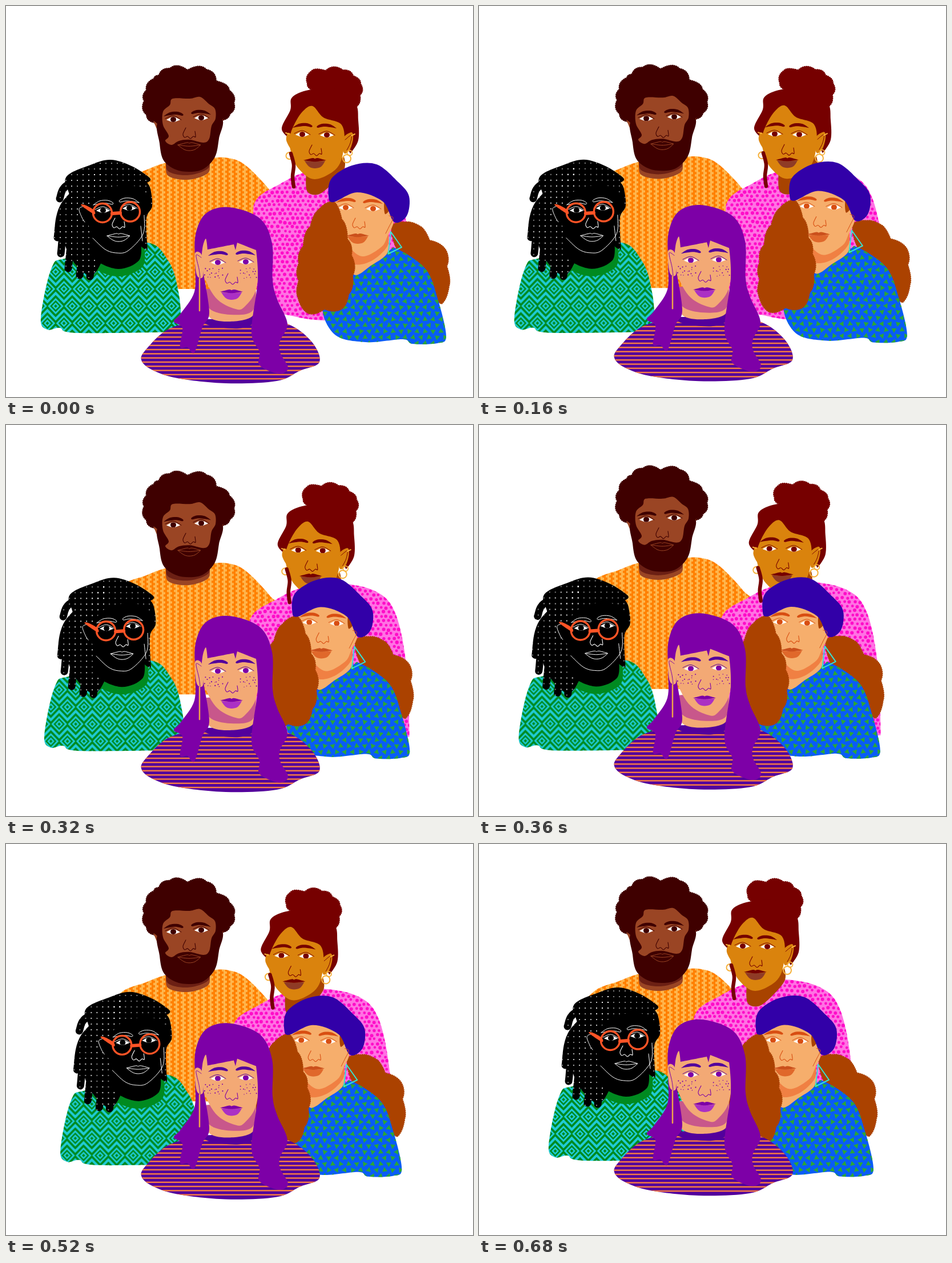
Recreate the animation shown at these times as an HTML page with a canvas. Size 818x684 px, loop 1.2 s.

```html
<!DOCTYPE html>
<html lang="en">
<head>
<meta charset="utf-8">
<title>Five friends</title>
<style>
html, body { margin: 0; width: 100%; height: 100%; overflow: hidden; background: #fff; }
canvas { display: block; width: 818px; height: 684px; }
</style>
</head>
<body>
<canvas id="stage" width="818" height="684"></canvas>
<script>
const ctx = document.getElementById('stage').getContext('2d');
const LOOP = 1200, STEP = 40, MOVE_FROM = 40, MOVE_FOR = 640;
const TAU = Math.PI * 2;

const points = text => text.split(' ').map(p => {
  const [x, y] = p.split(',').map(parseFloat);
  return { x, y, sharp: p.endsWith('!') };
});

// Smooth curve through "x,y x,y ..."; "!" marks a corner.
function curve(text, closed) {
  const pts = points(text), n = pts.length, path = new Path2D();
  const get = i => closed ? pts[(i + n) % n] : pts[Math.max(0, Math.min(n - 1, i))];
  const pull = (i, axis) => get(i).sharp ? 0 : (get(i + 1)[axis] - get(i - 1)[axis]) / 6;
  path.moveTo(pts[0].x, pts[0].y);
  for (let i = 0; i < (closed ? n : n - 1); i++) {
    const a = get(i), b = get(i + 1);
    path.bezierCurveTo(a.x + pull(i, 'x'), a.y + pull(i, 'y'),
      b.x - pull(i + 1, 'x'), b.y - pull(i + 1, 'y'), b.x, b.y);
  }
  return path;
}

function shape(paint, text) {
  ctx.fillStyle = paint;
  ctx.fill(curve(text, true));
}

function line(color, width, text, closed = false) {
  ctx.strokeStyle = color;
  ctx.lineWidth = width;
  ctx.stroke(curve(text, closed));
}

// Curly hair: one outward bump between each two points, with a rough edge.
function curls(color, bulge, text) {
  const pts = points(text), n = pts.length, path = new Path2D();
  const cx = pts.reduce((s, p) => s + p.x, 0) / n, cy = pts.reduce((s, p) => s + p.y, 0) / n;
  path.moveTo(pts[0].x, pts[0].y);
  pts.forEach((a, i) => {
    const b = pts[(i + 1) % n], mx = (a.x + b.x) / 2, my = (a.y + b.y) / 2;
    const k = 2 * bulge * Math.hypot(b.x - a.x, b.y - a.y) / Math.hypot(mx - cx, my - cy);
    path.quadraticCurveTo(mx + (mx - cx) * k, my + (my - cy) * k, b.x, b.y);
  });
  ctx.fillStyle = ctx.strokeStyle = color;
  ctx.fill(path);
  ctx.lineWidth = 2;
  ctx.setLineDash([1, 2.4]);
  ctx.stroke(path);
  ctx.setLineDash([]);
}

function circle(x, y, r) {
  const path = new Path2D();
  path.arc(x, y, r, 0, TAU);
  return path;
}

function ring(color, width, x, y, r) {
  ctx.strokeStyle = color;
  ctx.lineWidth = width;
  ctx.stroke(circle(x, y, r));
}

function at(x, y, flip, draw) {
  ctx.save();
  ctx.translate(x, y);
  ctx.scale(flip, 1);
  draw();
  ctx.restore();
}

function eye(iris, lid) {
  const almond = curve('-12,0! 0,-5 12,0! 0,4', true);
  ctx.save();
  ctx.fillStyle = '#fff';
  ctx.fill(almond);
  ctx.clip(almond);
  ctx.fillStyle = iris;
  ctx.fill(circle(0, -0.5, 5));
  ctx.restore();
  line(lid, 1, '-14,-2 0,-7 14,0');
}

// Both eyes with their brows; an outlined face gets open brows.
function gaze(lx, ly, rx, ry, lift, iris, brow, outlined) {
  [[lx, ly, 1], [rx, ry, -1]].forEach(([x, y, flip]) => {
    at(x, y, 1, () => eye(iris, brow));
    at(x, y - lift, flip, () => {
      const text = '-17,4! -6,-3 8,-4 17,0 16,3 6,1 -6,2';
      outlined ? line(brow, 1, text, true) : shape(brow, text);
    });
  });
}

const nose = (color, x, y) => at(x, y, 1, () =>
  line(color, 1.1, '-5,-16 -10,-5 -7,1 -2,-1 3,3 8,-1 12,0 11,-10'));

function lips(x, y, upper, lower, outlined) {
  at(x, y, 1, () => {
    const top = '-20,0! -4,-4 0,-3 5,-4 20,0! 5,2 -5,2', bottom = '-18,1! 0,2 18,1! 11,11 0,14 -10,11';
    if (outlined) {
      line(upper, 1, top, true);
      line(upper, 1, '-19,1 -9,8 0,10 10,8 19,1');
    } else {
      shape(lower, bottom);
      shape(upper, top);
    }
  });
}

function tile(w, h, draw) {
  const c = document.createElement('canvas');
  c.width = w;
  c.height = h;
  draw(c.getContext('2d'));
  return ctx.createPattern(c, 'repeat');
}

let seed = 11;
const rand = () => (seed = seed * 16807 % 2147483647) / 2147483647;
const jitter = size => (rand() - 0.5) * size;

// Staggered rows of small marks in one path.
function scatter(x0, y0, x1, y1, dx, dy, mark) {
  const path = new Path2D();
  for (let row = 0, y = y0; y < y1; y += dy, row++)
    for (let x = x0 + row % 2 * dx / 2; x < x1; x += dx) path.addPath(mark(x, y));
  return path;
}

function triangle(x, y) {
  const path = new Path2D(), turn = rand() * TAU;
  for (let i = 0; i < 3; i++) path.lineTo(x + 5.2 * Math.cos(turn + i * TAU / 3), y + 5.2 * Math.sin(turn + i * TAU / 3));
  path.closePath();
  return path;
}

const weave = tile(12, 16, g => {
  g.fillStyle = '#ffb54c';
  g.fillRect(0, 0, 12, 16);
  g.fillStyle = '#ff8000';
  for (let i = 0; i < 4; i++) g.fillRect(i % 2 * 3, i * 4, 6, 4);
});

// Staggered diamonds with a zigzag band between the rows.
const diamonds = tile(29, 60, g => {
  const w = 14.5, cyan = '#20cbd6', green = '#008a20';
  g.fillStyle = green;
  g.fillRect(0, 0, 29, 60);
  for (const [x, y] of [[w, 15], [0, 45], [29, 45]])
    [0.95, 0.68, 0.44, 0.2].forEach((k, i) => {
      g.fillStyle = i % 2 ? green : cyan;
      g.fill(new Path2D(`M${x - w * k} ${y}l${w * k} ${-15 * k}l${w * k} ${15 * k}l${-w * k} ${15 * k}Z`));
    });
  g.strokeStyle = cyan;
  g.lineWidth = 4;
  for (const [y, rise] of [[22.5, 15], [7.5, -15], [67.5, -15]])
    g.stroke(new Path2D(`M${-w} ${y + rise}l${w} ${-rise}l${w} ${rise}l${w} ${-rise}l${w} ${rise}`));
});

const specks = tile(10, 10, g => {
  g.fillStyle = '#fff';
  g.fill(circle(5, 5, 0.85));
});

const dots = scatter(430, 280, 720, 556, 9, 7.6, (x, y) => circle(x + jitter(2.4), y + jitter(2.4), 2.3 + rand() * 0.9));
const triangles = scatter(552, 422, 778, 596, 14, 10.5, triangle);
const freckles = scatter(350, 460, 440, 480, 7, 5, (x, y) =>
  circle(x + jitter(5), y + jitter(5), Math.abs(x - 395) > 15 ? 0.6 + rand() * 0.5 : 0));

function clipped(base, text, draw) {
  shape(base, text);
  ctx.save();
  ctx.clip(curve(text, true));
  draw();
  ctx.restore();
}

function print(base, color, marks, text) {
  clipped(base, text, () => {
    ctx.fillStyle = color;
    ctx.fill(marks);
  });
}

function bearded() {
  const dark = '#3f0000', skin = '#9a4524', neck = '282,268! 283,296 318,304 354,292 355,268!';
  shape(weave, '283,274 245,287 200,306 178,350 172,492! 300,495 460,496! 484,360 462,322 420,279 390,266 355,266');
  shape(skin, neck);
  at(0, -8, 1, () => shape('#6c2014', neck));
  curls(dark, 0.2, '260,204 246,190 242,166 246,147 259,127 268,121 287,109 318,112 351,111 368,131 391,147 399,169 392,189 376,200 320,210');
  shape(skin, '258,201! 267,209 270,229!');
  shape(skin, '381,197! 372,208 372,228!');
  shape(dark, '268,200 269,240 276,270 297,286 322,290 346,285 366,264 373,232 377,195 322,180');
  shape(skin, '275,208 275,185 287,173 292,162 322,162 340,159 355,171 366,180 367,197 360,210 356,232 346,239 322,234 303,236 290,243 279,236 285,227');
  gaze(293, 199, 342, 196, 10, dark, dark);
  nose(dark, 320, 229);
  lips(321, 243, skin, skin, true);
}

function bunned() {
  const hair = '#760000', skin = '#da830d', gold = '#f6b13a';
  print('#ff72e3', '#ff0cc8', dots, '524,291 477,313 440,337 433,375 440,500 466,535! 495,541 557,550 714,551! 709,430 690,337 657,298 593,283');
  curls(hair, 0.2, '536,147 528,136 535,114 560,113 590,112 608,122 621,136 620,156 610,178 570,170');
  shape(hair, '500,234! 483,215 498,182 501,160 530,147 580,145 612,170 617,200 617,235 603,258! 575,230');
  shape('#a84300', '526,290! 527,323 545,330 565,317 592,286 592,264!');
  shape(skin, '494,222 491,235 500,250 501,228');
  shape(skin, '590,232 605,221 608,232 602,252 592,257');
  shape(skin, '497,230 505,207 520,184 537,175 556,195 588,208 592,245 580,283 541,303 512,284 499,255');
  line(hair, 1, '594,234 605,226 603,240 597,252');
  gaze(519, 225, 562, 226, 16, hair, hair);
  nose(hair, 541, 259);
  lips(541, 270, hair, '#8f3b26');
  ring(gold, 2, 496.5, 262, 6);
  ring(gold, 2, 597, 267, 7);
  ring(gold, 1.8, 602, 257, 4.5);
  line(gold, 2, '490,222 496,224');
  line(gold, 2, '605,227 611,224');
  line(hair, 6.5, '499,258 504,278 502,298 504,316');
}

function dreads(paint) {
  shape(paint, '105,300 148,278 183,269 220,280 252,301 247,309! 253,320 256,350 246,372 248,426! 236,420 200,380 152,470 104,420 112,340');
  for (const { x, y } of points('94,337 90,405 96,433 109,459 129,471 147,473'))
    line(paint, 13, `165,290 ${x + 13},${(290 + y) / 2} ${x},${y}`);
}

function glasses() {
  const rim = '#ff5426';
  shape(diamonds, '110,440 80,458 61,545 72,566 94,563 125,572 308,570! 303,505 285,447 240,413');
  shape('#008a20', '150,430! 156,459 198,473 240,455 241,412!');
  dreads('#000');
  dreads(specks);
  shape('#000', '153,410! 155,442 196,460 233,445 236,412!');
  shape('#000', '148,346 165,325 212,313 246,330 243,380 231,418 194,432 154,410 145,385 129,360');
  line('#fff', 1, '242,366 240,399 214,428 194,432 174,426 152,406');
  line('#fff', 1, '137,350 128,355 133,370 138,378');
  line('#fff', 1, '236,385 239,411');
  gaze(170, 358, 216, 354, 14, '#000', '#fff', true);
  ring(rim, 3.4, 169, 362, 16.5);
  ring(rim, 3.4, 217.5, 360, 17);
  line(rim, 6, '186,363 200,362');
  shape(rim, '132,349 138,348 154,357 154,364');
  nose('#fff', 196, 387);
  lips(197, 402, '#fff', '#fff', true);
}

function beret() {
  const hair = '#ab4200', skin = '#f6ae6c', accent = '#d84e12';
  curls(hair, 0.12, '676,384 700,378 728,387 742,410 771,428 772,455 776,490 763,521 700,450');
  print('#095cf6', '#2ba636', triangles, '610,469 668,430 685,425 735,460 757,515 771,578 755,590 712,591 695,583 630,588 575,574 556,520');
  shape(skin, '604,425! 610,470 641,453 668,432 669,400!');
  shape('#f08043', '600,424! 609,451 640,446 668,420 669,392!');
  shape(skin, '576,340 600,322 640,325 666,342 680,372 668,403 657,422 624,438 597,415 578,370');
  curls(hair, 0.13, '574,342 548,356 533,386 521,420 513,450 513,480 511,508 530,538 558,530 588,530 600,504 607,472 605,436 598,408 588,373');
  shape(hair, '663,343 674,352 664,364');
  shape('#3200a8', '565,333 570,302 606,279 649,277 687,308 706,333 702,367 680,378 660,342 615,326 574,343');
  line(accent, 1, '671,367 678,371 671,386 665,398');
  gaze(595, 353, 643, 355, 13, accent, accent);
  nose(accent, 617, 387);
  lips(616, 402, '#cb501c', '#e0682b');
  line('#36e3d2', 2, '674,395! 693,422! 669.5,433.5!', true);
}

function fringed() {
  const hair = '#7d00a7', skin = '#f3a975', dark = '#53009c';
  clipped(dark, '345,551 285,565 246,600 237,619 255,636 300,651 385,660 474,656 515,638 549,623 536,588 495,557 437,550', () => {
    ctx.fillStyle = '#f47a43';
    for (let y = 556; y < 658; y += 7.3) ctx.fillRect(230, y, 325, 2.5);
  });
  shape(dark, '344,548! 390,546 433,539! 439,552 408,564 357,559');
  shape(skin, '352,500! 354,542 390,552 434,540 437,490!');
  shape('#c8578b', '351,495! 356,529 393,540 432,533 437,490!');
  shape(skin, '340,405 400,395 445,415 439,492 419,525 402,530 367,510 343,460');
  shape(hair, '390,352 350,363 332,400 331,450 330,500 306,538 294,552 309,563 305,596 318,597 330,606 344,562 356,535 344,455 344,425 350,407 353,426! 399,417! 402,427! 405,414! 438,427! 441,480 430,570 444,605 443,627 465,640 484,643 494,632 480,606 480,586 493,556 475,513 467,480 466,415 444,371');
  shape(skin, '343,436 331,433 334,470 345,473');
  line(hair, 1, '342,440 333,436 338,460 340,475');
  line('#f1a34b', 2.5, '339,477 339,533');
  gaze(371, 449, 420, 448, 16, hair, dark);
  nose(hair, 394, 484);
  ctx.fillStyle = hair;
  ctx.fill(freckles);
  lips(395, 500, hair, '#ab30c4');
}

// Each figure's way, with the two handles of its easing curve.
const cast = [
  { draw: bearded, dx: 0, dy: -47, out: 0.67, into: 0.16 },
  { draw: bunned, dx: -57, dy: -46, out: 0.865, into: 0.664 },
  { draw: glasses, dx: 61, dy: -18, out: 0.975, into: 0.64 },
  { draw: beret, dx: -80, dy: -9.5, out: 0.308, into: 0.055 },
  { draw: fringed, dx: 0, dy: -45, out: 0.37, into: 0.63 }
];

// cubic-bezier(out, 0, into, 1), solved by bisection.
function ease(p, out, into) {
  let lo = 0, hi = 1;
  for (let i = 0; i < 24; i++) {
    const s = (lo + hi) / 2, r = 1 - s;
    if (3 * r * r * s * out + 3 * r * s * s * into + s * s * s < p) lo = s;
    else hi = s;
  }
  return lo * lo * (3 - 2 * lo);
}

ctx.lineCap = ctx.lineJoin = 'round';
let shown = -1;

function render(t) {
  const p = Math.max(0, Math.min(1, (t - MOVE_FROM) / MOVE_FOR));
  ctx.fillStyle = '#fff';
  ctx.fillRect(0, 0, 818, 684);
  for (const { draw, dx, dy, out, into } of cast) {
    const k = ease(p, out, into);
    at(dx * k, dy * k, 1, draw);
  }
}

const start = performance.now();
function tick() {
  const t = Math.floor((performance.now() - start) % LOOP / STEP) * STEP;
  if (t !== shown) render(shown = t);
  requestAnimationFrame(tick);
}
tick();
</script>
</body>
</html>
```
